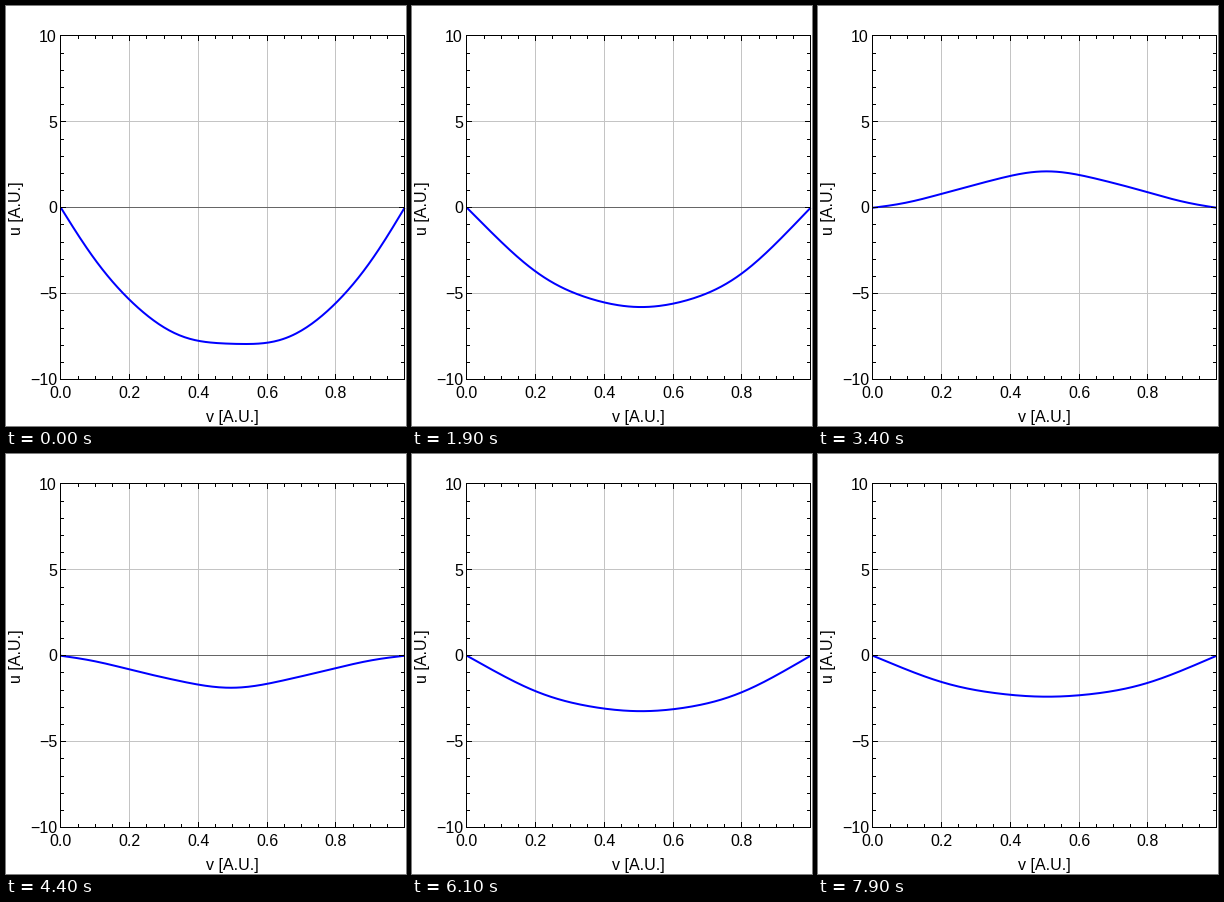
A matplotlib script that plays this animation: 400x420 px, repeating every 8000 ms.

```python
import numpy as np
import matplotlib.pyplot as plt
from matplotlib.animation import FuncAnimation

W, H, DPI = 400, 420, 100
PX = 72 / DPI                      # points per pixel
LEFT, TOP, SIDE = 54.9, 29.9, 343.7  # square plot frame
RIGHT, BOTTOM = LEFT + SIDE, TOP + SIDE
FRAMES, INTERVAL = 80, 100
DECAY = -np.log(0.862) / 10        # amplitude loss per frame
OMEGA = np.pi / 10                 # fundamental frequency per frame
SAG = -0.02                        # rest position at mid-string

# standing waves: (mode, amplitude, phase)
MODES = [(1, -8.49, np.radians(3.2)), (2, 0.095, 0), (3, -0.53, 0), (7, -0.05, 0)]

plt.rcParams["font.family"] = "Liberation Sans"
fig = plt.figure(figsize=(W / DPI, H / DPI), dpi=DPI, facecolor="white")
ax = fig.add_axes([0, 0, 1, 1])
ax.set_xlim(0, W)
ax.set_ylim(H, 0)
ax.axis("off")


def to_x(v):
    return LEFT + SIDE * v


def to_y(u):
    return TOP + SIDE * (10 - u) / 20


def hline(y, x0, x1, color="black", z=4):
    y = np.floor(y) + 0.5
    ax.plot([np.floor(x0), np.floor(x1) + 1], [y, y], color=color, lw=PX,
            zorder=z, solid_capstyle="butt", snap=False)


def vline(x, y0, y1, color="black", z=4):
    x = np.floor(x) + 0.5
    ax.plot([x, x], [np.floor(y0), np.floor(y1) + 1], color=color, lw=PX,
            zorder=z, solid_capstyle="butt", snap=False)


def label(x, y, text, ha="center"):
    ax.text(x, y, text, ha=ha, va="baseline", fontsize=16 * PX)


def draw_axes():
    for v in (0.2, 0.4, 0.6, 0.8):
        vline(to_x(v), TOP, BOTTOM, "#c4c4c4", 1)
    for u in (-5, 5):
        hline(to_y(u), LEFT, RIGHT, "#c4c4c4", 1)
    hline(to_y(0), LEFT, RIGHT, "#666666", 2)

    for i in range(21):
        x, size = to_x(i / 20), 3 if i % 4 else 5
        vline(x, TOP, TOP + size)
        vline(x, BOTTOM - size, BOTTOM)
        y, size = to_y(i - 10), 3 if i % 5 else 5
        hline(y, LEFT, LEFT + size)
        hline(y, RIGHT - size, RIGHT)
    for x in (LEFT, RIGHT):
        vline(x, TOP, BOTTOM)
    for y in (TOP, BOTTOM):
        hline(y, LEFT, RIGHT)

    for u in range(-10, 11, 5):
        label(51, to_y(u) + 5.7, str(u).replace("-", "\u2212"), "right")
    for i in range(5):
        label(to_x(i / 5), 392, f"{i / 5:.1f}")
    label(226.7, 416, "v [A.U.]")
    ax.text(11, to_y(0), "u [A.U.]", rotation=90, ha="center", va="center",
            fontsize=16 * PX)


def string_shape(v, n):
    waves = sum(a * np.sin(k * np.pi * v) * np.cos(k * OMEGA * n - p)
                for k, a, p in MODES)
    return SAG * np.sin(np.pi * v) + np.exp(-DECAY * n) * waves


draw_axes()
v = np.linspace(0, 1, 201)
curve, = ax.plot([], [], color="#0000ff", lw=2 * PX, zorder=3,
                 solid_capstyle="butt")


def update(n):
    curve.set_data(to_x(v), to_y(string_shape(v, n)))
    return curve,


anim = FuncAnimation(fig, update, frames=FRAMES, interval=INTERVAL,
                     repeat=True, repeat_delay=0, blit=False)
plt.show()
```
